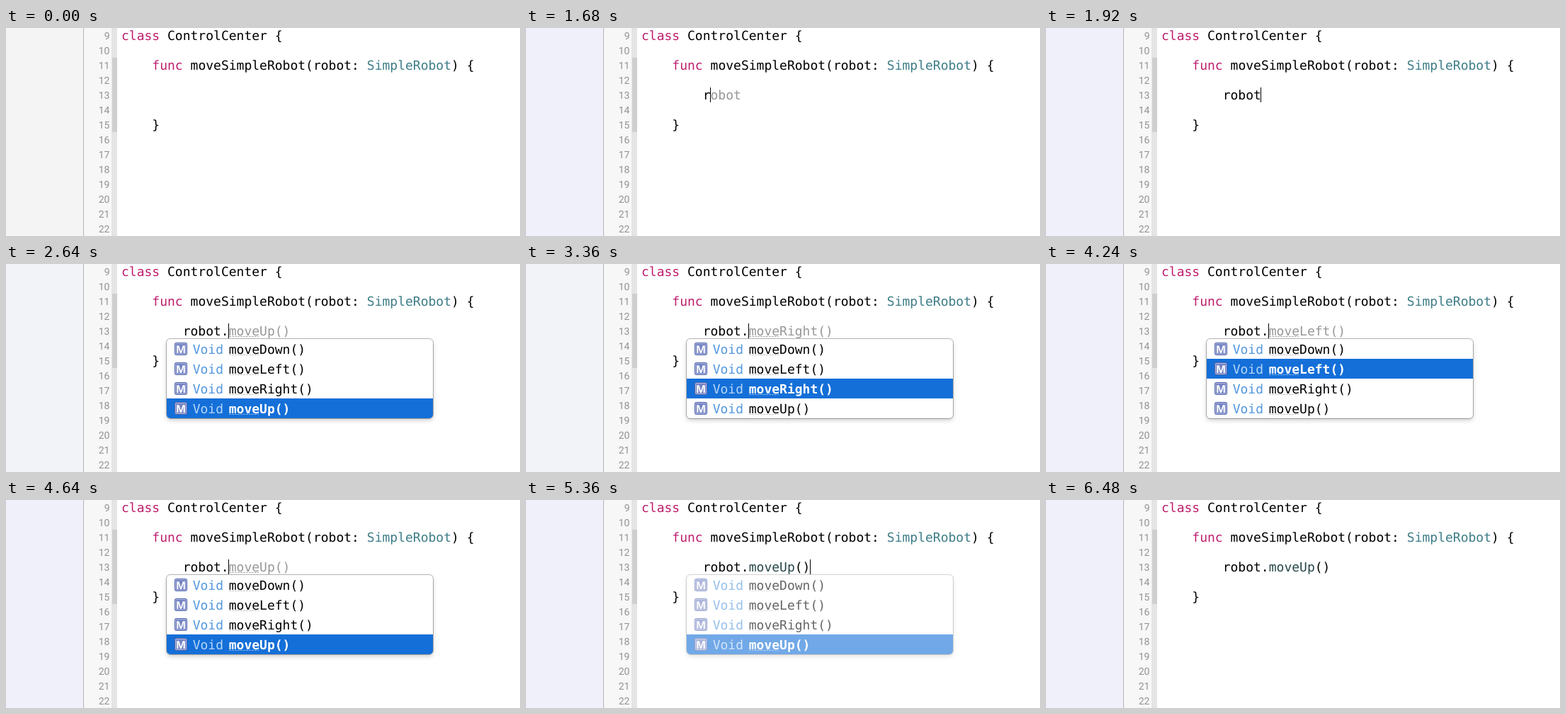
These frames come from a looping animation (726x294 px, 6640 ms). An HTML page:

```html
<!DOCTYPE html>
<html lang="en">
<head>
<meta charset="utf-8">
<title>Code completion</title>
<style>
html, body { margin: 0; width: 100%; height: 100%; overflow: hidden; background: #fff; }
svg { display: block; width: 726px; height: 294px; }
text { font: 18px "DejaVu Sans Mono", monospace; white-space: pre; text-rendering: geometricPrecision; }
.num { font: 14px Roboto, sans-serif; fill: #929292; text-anchor: end; }
.key { fill: #bf1d6c; }
.type { fill: #3e7d88; }
.call { fill: #26474b; }
.ghost { fill: #979797; }
.void { fill: #5498de; }
.icon { font: bold 15px "Open Sans", sans-serif; fill: #fff; text-anchor: middle; }
.on .name { font-weight: bold; fill: #fff; }
.on .void { fill: #b4d5f8; }
.panel { filter: drop-shadow(0 3px 3px rgba(0, 0, 0, .2)); }
</style>
</head>
<body>
<svg viewBox="0 0 726 294">
  <defs><clipPath id="round"><rect x="227" y="106" width="376" height="112" rx="5"/></clipPath></defs>
  <rect id="side" width="109" height="294"/>
  <rect x="109" width="1" height="294" fill="#b4b4b4"/>
  <rect x="110" width="39" height="294" fill="#f7f7f7"/>
  <rect x="149" width="8" height="294" fill="#e5e5e5"/>
  <rect x="150" y="42" width="7" height="105" fill="#cfcfcf"/>
  <g id="code"></g>
  <g id="live"></g>
</svg>
<script>
const LOOP = 6640, CHAR = 10.836, LEFT = 163, LINE = 13;
const items = ['moveDown()', 'moveLeft()', 'moveRight()', 'moveUp()'];
const [DOWN, LEFTWARD, RIGHT, UP] = [0, 1, 2, 3];
const $ = id => document.getElementById(id);

const colX = col => LEFT + col * CHAR;
const baseY = line => 17 + (line - 9) * 21;
const span = (cls, s) => `<tspan class="${cls}">${s}</tspan>`;
const text = (x, y, s, cls = '') => `<text x="${x}" y="${y}" class="${cls}">${s}</text>`;
const rect = (x, y, w, h, fill, more = '') =>
  `<rect x="${x}" y="${y}" width="${w}" height="${h}" fill="${fill}" ${more}/>`;
const dashes = (y, color) =>
  `<path d="M315 ${y + 1.5}H357" stroke="${color}" stroke-dasharray="3 1"/>`;

// Each step overrides only the properties it names.
const steps = [
  [0, { typed: '', ghost: '', caret: 0, pick: -1, alpha: 0, side: '#f4f4f4' }],
  [320, { caret: 1 }],
  [800, { caret: 0 }],
  [1360, { caret: 1 }],
  [1600, { typed: 'r', side: '#f0f0fa' }],
  [1680, { ghost: 'obot' }],
  [1760, { typed: 'ro', ghost: 'bot' }],
  [1840, { typed: 'rob', ghost: 'ot' }],
  [1920, { typed: 'robot', ghost: '' }],
  [2240, { typed: 'robot.', side: '#f1f3f8' }],
  [2480, { pick: UP, alpha: .5 }],
  [2560, { alpha: .8 }],
  [2640, { alpha: 1 }],
  [3120, { caret: 0 }],
  [3360, { caret: 1, pick: RIGHT }],
  [3600, { pick: LEFTWARD, side: '#f0f0fa' }],
  [3760, { pick: DOWN }],
  [4240, { pick: LEFTWARD }],
  [4480, { pick: RIGHT }],
  [4640, { pick: UP }],
  [5040, { pick: RIGHT }],
  [5200, { pick: UP }],
  [5360, { typed: 'robot.moveUp()', alpha: .6 }],
  [5440, { alpha: .3 }],
  [5520, { alpha: 0, pick: -1, caret: 0 }],
  [5920, { caret: 1 }],
  [6480, { caret: 0 }],
];

function row(name, i, picked) {
  const top = 106 + i * 28, y = top + 21;
  return `<g class="${picked ? 'on' : ''}">` +
    (picked ? rect(227, top, 376, 28, '#146fd8') : '') +
    rect(238.5, top + 5.5, 17, 17, '#7584c4', 'rx="2" stroke="#5063ab"') +
    rect(239.5, top + 6.5, 15, 15, 'none', 'rx="1" stroke="#b3bce0"') +
    text(247, top + 19.5, 'M', 'icon') +
    text(263.7, y, 'Void', 'void') + text(colX(14), y, name, 'name') +
    dashes(y, picked ? '#7fb3ee' : '#c4c4c4') + '</g>';
}

function popup({ pick, alpha }) {
  return `<g opacity="${alpha}">` +
    rect(227, 106, 376, 112, '#fff', 'rx="5" class="panel"') +
    `<g clip-path="url(#round)">${items.map((n, i) => row(n, i, i === pick)).join('')}</g>` +
    rect(226.5, 105.5, 377, 113, 'none', 'rx="5.5" stroke="#000" stroke-opacity=".28"') + '</g>';
}

function live(s) {
  const y = baseY(LINE), end = 8 + s.typed.length;
  const choosing = s.typed === 'robot.' && s.pick >= 0;
  const ghost = choosing ? items[s.pick] : s.ghost;
  return text(colX(8), y, s.typed.replace('moveUp', span('call', 'moveUp')) + span('ghost', ghost)) +
    (choosing ? dashes(y, '#b0b0b0') : '') +
    (s.caret ? rect(Math.floor(colX(end)), 84, 1, 21, '#000') : '') +
    (s.alpha ? popup(s) : '');
}

let code = '';
for (let n = 9; n <= 22; n++) code += text(146.5, baseY(n) - 1.5, n, 'num');
code += text(colX(0), baseY(9), span('key', 'class') + ' ControlCenter {');
code += text(colX(4), baseY(11), span('key', 'func') + ' moveSimpleRobot(robot: ' + span('type', 'SimpleRobot') + ') {');
code += text(colX(4), baseY(15), '}');
$('code').innerHTML = code;

let shown = -1;
function draw() {
  const t = performance.now() % LOOP;
  const past = steps.filter(([at]) => at <= t);
  if (past.length !== shown) {
    shown = past.length;
    const state = Object.assign({}, ...past.map(p => p[1]));
    $('side').setAttribute('fill', state.side);
    $('live').innerHTML = live(state);
  }
  requestAnimationFrame(draw);
}
draw();
</script>
</body>
</html>
```
